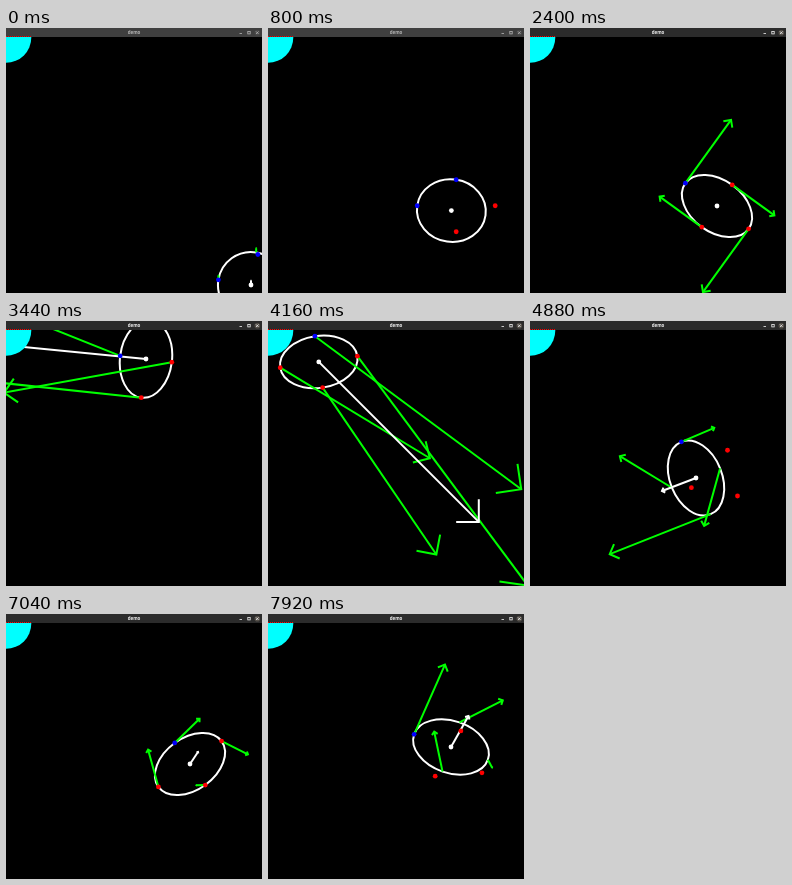
An HTML page with a canvas for the animation above (8 s loop, 256 px wide and 265 px high).

```html
<!DOCTYPE html>
<html>
<head>
<meta charset="utf-8">
<style>
html, body { margin: 0; width: 100%; height: 100%; overflow: hidden; background: #000; }
canvas { display: block; }
</style>
</head>
<body>
<canvas id="stage" width="256" height="265"></canvas>
<script>
const ctx = document.getElementById('stage').getContext('2d');
const LOOP = 8000, LONG = 39, SHORT = 26, BAR = 9;
const rad = deg => deg * Math.PI / 180;

// time, centre x, y, angle
const poses = [
  [0, 245, 257, 9],
  [120, 243, 255, 8],
  [700, 183, 183, 8],
  [1800, 187, 178, 8],
  [2150, 187, 178, 8],
  [2680, 187, 178, 67],
  [3100, 195, 43, 62],
  [3440, 140, 38, 97],
  [4080, 38, 28, 163],
  [4880, 166, 157, 248],
  [5700, 176, 149, 276],
  [6200, 176, 149, 276],
  [7040, 184, 150, 324],
  [7920, 183, 133, 379]
];

// time, velocity x, y, spin; held until the next entry
const speeds = [
  [0, 0, -4, 0],
  [120, -130, -150, 0],
  [700, 0, 0, 0],
  [2150, 0, 0, 2],
  [2680, 0, 0, 0],
  [3100, -162, -16, 1.8],
  [4080, 160, 160, 1.8],
  [4840, -34, 13, 1.85],
  [5300, -90, -70, 0.6],
  [5640, 0, 0, 0],
  [6240, 8, -12, 0.8],
  [7080, 17.5, -31, 1.05]
];

// time, angle between the guide points and the ellipse
const lags = [[0, -8], [1200, -8], [1800, 0], [4600, 0], [4880, -24], [5600, 0], [7080, 0], [7920, 10.6]];

function blend(track, t) {
  const i = Math.min(track.findLastIndex(k => k[0] <= t), track.length - 2);
  const a = track[i], b = track[i + 1], f = (t - a[0]) / (b[0] - a[0]);
  return a.map((v, n) => v + (b[n] - v) * f).slice(1);
}

function disc(x, y, r, color) {
  ctx.fillStyle = color;
  ctx.beginPath();
  ctx.arc(x, y, r, 0, 2 * Math.PI);
  ctx.fill();
}

function line(color, width, ...pts) {
  ctx.strokeStyle = color;
  ctx.lineWidth = width;
  ctx.beginPath();
  pts.forEach(p => ctx.lineTo(p[0], p[1]));
  ctx.stroke();
}

function arrow(x, y, dx, dy, color) {
  const len = Math.hypot(dx, dy);
  if (len < 1.5) return;
  const dir = Math.atan2(dy, dx), tip = [x + dx, y + dy];
  const wing = side => [
    tip[0] - 0.1 * len * Math.cos(dir + side),
    tip[1] - 0.1 * len * Math.sin(dir + side)
  ];
  line(color, 2, [x, y], tip);
  line(color, 2, wing(Math.PI / 4), tip, wing(-Math.PI / 4));
}

// the four ends of the axes, relative to the centre
function axisEnds(angle, a, b) {
  return [0, 1, 2, 3].map(i => {
    const r = i % 2 ? b : a, dir = rad(angle + 90 * i);
    return [r * Math.cos(dir), r * Math.sin(dir)];
  });
}

function drawBody(t) {
  const [x, y, angle] = blend(poses, t);
  const [lag] = blend(lags, t);
  const [, vx, vy, spin] = speeds.findLast(s => s[0] <= t);
  const stretch = t < 800 ? t / 3200 : Math.min(1, 0.25 + (t - 800) / 1300);
  const a = 33 + (LONG - 33) * stretch, b = 33 + (SHORT - 33) * stretch;
  const ends = axisEnds(angle, a, b);
  const guide = axisEnds(angle + lag, LONG, SHORT);
  const pin = [0, 1, 2, 3].find(i => Math.floor(angle / 90 + i) % 4 === 2);
  const still = !spin && Math.hypot(vx, vy) < 5;

  ctx.strokeStyle = '#fff';
  ctx.lineWidth = 2;
  ctx.beginPath();
  ctx.ellipse(x, y, a, b, rad(angle), 0, 2 * Math.PI);
  ctx.stroke();

  ends.forEach(([dx, dy]) =>
    arrow(x + dx, y + dy, vx - spin * dy, vy + spin * dx, '#0f0'));
  arrow(x, y, vx, vy, '#fff');
  disc(x, y, 2.4, '#fff');

  const gx = x + ends[pin][0] - guide[pin][0];
  const gy = y + ends[pin][1] - guide[pin][1];
  guide.forEach(([dx, dy], i) => {
    const blue = i === pin || (still && i === (pin + 1) % 4);
    disc(gx + dx, gy + dy, 2.4, blue ? '#00f' : '#f00');
  });
}

function drawBar(active) {
  const ink = active ? '#f0f0f0' : '#b4b4b4';
  ctx.fillStyle = active ? '#2b2b2b' : '#3f3f3f';
  ctx.fillRect(0, 0, 256, BAR);
  ctx.fillStyle = ink;
  ctx.font = 'bold 4.5px "Open Sans", sans-serif';
  ctx.textAlign = 'center';
  ctx.fillText('demo', 128, 6.3);
  line(ink, 0.8, [233.5, 5.5], [236, 5.5]);
  ctx.strokeRect(241.8, 3.5, 2.4, 2.4);
  disc(251.3, 4.7, 2.8, active ? '#55504a' : '#4a4a4a');
  line(ink, 0.8, [250, 3.4], [252.6, 6]);
  line(ink, 0.8, [252.6, 3.4], [250, 6]);
}

function draw(t) {
  ctx.fillStyle = '#000';
  ctx.fillRect(0, 0, 256, 265);
  drawBody(t);
  disc(0, BAR + 0.5, 25.3, '#0ff');
  drawBar(t >= 1000);
  ctx.setLineDash([1, 1]);
  line('#f00', 1, [0, 8.5], [25, 8.5]);
  ctx.setLineDash([]);
}

let start;
function tick(now) {
  start ??= now;
  draw((now - start) % LOOP);
  requestAnimationFrame(tick);
}
draw(0);
requestAnimationFrame(tick);
</script>
</body>
</html>
```
